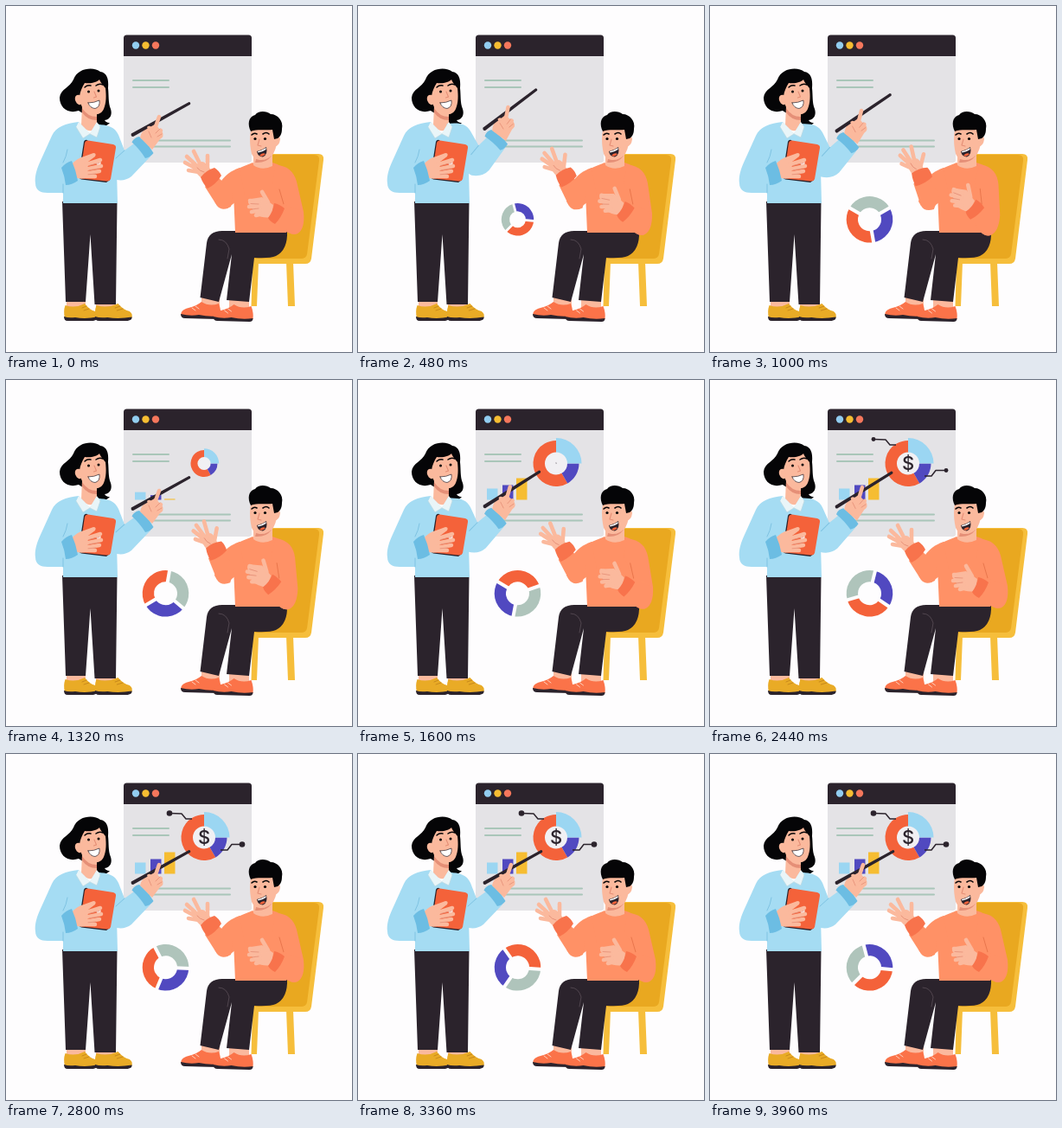
These frames come from a looping animation (400x400 px, 4 s). An HTML page with a canvas:

```html
<!DOCTYPE html>
<html lang="en">
<head>
<meta charset="utf-8">
<title>Presentation</title>
<style>
html, body { margin: 0; width: 100%; height: 100%; overflow: hidden; background: #fefdfe; }
canvas { display: block; width: 100vw; height: 100vh; }
</style>
</head>
<body>
<canvas id="stage"></canvas>
<script>
const canvas = document.getElementById('stage');
const ctx = canvas.getContext('2d');
const LOOP = 4000, STEP = 40;
const C = {
  bg: '#fefdfe', dark: '#2b232c', hair: '#050507', skin: '#fbb99d', crease: '#e58f77',
  panel: '#e4e3e6', rule: '#a9c6b9', blue: '#a5dcf3', cuff: '#6cbde3', fold: '#7fc3e2',
  red: '#f4623a', purple: '#5149c0', grey: '#afc4bb', sky: '#9bd6f2', yellow: '#f6bd32',
  seat: '#f6be3b', back: '#e9a820', shirt: '#ff9166', wrist: '#f8734c', shoe: '#fb7349'
};

const clamp = x => Math.max(0, Math.min(1, x));
const span = (t, a, b) => clamp((t - a) / (b - a));
const ease = x => x * x * (3 - 2 * x);
const wave = (t, period, end) => t < end ? (1 - Math.cos(2 * Math.PI * t / period)) / 2 : 0;
const rad = deg => deg * Math.PI / 180;

function fill(d, color) {
  ctx.fillStyle = color;
  ctx.fill(new Path2D(d));
}
function line(d, color, width = 1) {
  ctx.strokeStyle = color;
  ctx.lineWidth = width;
  ctx.stroke(new Path2D(d));
}
function dot(x, y, r, color) {
  ctx.fillStyle = color;
  ctx.beginPath();
  ctx.arc(x, y, Math.max(0, r), 0, 2 * Math.PI);
  ctx.fill();
}
function box(x, y, w, h, color) {
  ctx.fillStyle = color;
  ctx.fillRect(x, y, w, h);
}
function turned(x, y, deg, draw) {
  ctx.save();
  ctx.translate(x, y);
  ctx.rotate(rad(deg));
  ctx.translate(-x, -y);
  draw();
  ctx.restore();
}
// Angles in degrees clockwise from the top.
function sector(x, y, inner, outer, from, to, color) {
  const a = rad(from - 90), b = rad(to - 90);
  ctx.fillStyle = color;
  ctx.beginPath();
  ctx.arc(x, y, outer, a, b);
  ctx.arc(x, y, inner, b, a, true);
  ctx.closePath();
  ctx.fill();
}

function drawPanel() {
  fill('M136 58H284V178Q284 181 281 181H139Q136 181 136 178Z', C.panel);
  fill('M136 58V37Q136 33.500 139.500 33.500H280.500Q284 33.500 284 37V58Z', C.dark);
  [['#92cdf0', 150], [C.yellow, 161.500], ['#f5775c', 173]].forEach(([color, x]) => dot(x, 45.500, 4.200, color));
  line('M147 86H188M147 94H188M150 155.500H259M150 162.500H259', C.rule, 2);
}

function drawBars(t) {
  [[149, 13, C.sky], [167, 17, C.purple], [183, 25, C.yellow]].forEach(([x, h, color], i) => {
    const now = h * ease(span(t, 1120 + i * 80, 1440 + i * 80));
    box(x, 138.500 - now, 12.500, now, color);
  });
}

function drawChart(t) {
  const x = 229, y = 96.500;
  const grow = ease(span(t, 1120, 1480));
  if (!grow) return;
  dot(x, y, 14 * grow, '#f1f0f3');
  sector(x, y, 13 * grow, 26.500 * grow, 150, 360, C.red);
  sector(x, y, 13 * grow, 26.500 * grow, 90, 150, C.purple);
  sector(x, y, 13 * grow, 29.500 * grow, 0, 90, C.sky);

  const size = ease(span(t, 1520, 2000));
  if (size) {
    ctx.save();
    ctx.translate(x, y + 0.500);
    ctx.scale(size, size);
    ctx.fillStyle = C.dark;
    ctx.font = '500 22px Inter, Arial, sans-serif';
    ctx.textAlign = 'center';
    ctx.textBaseline = 'middle';
    ctx.fillText('$', 0, 0);
    ctx.restore();
  }
  drawLead(t, 'M215 75H208L203 69L189 68.500', 189, 68.500);
  drawLead(t, 'M248 111H256L261 104.500H273', 273, 104.500);
}

function drawLead(t, d, x, y) {
  const k = span(t, 1880, 2320), length = 31;
  if (k) {
    ctx.save();
    ctx.lineCap = 'butt';
    ctx.setLineDash([length * k, 60]);
    line(d, C.dark, 1.500);
    ctx.restore();
  }
  dot(x, y, 3.300 * ease(span(t, 2280, 2520)), C.dark);
}

function drawRing(t) {
  const k = ease(span(t, 200, 640));
  if (!k) return;
  const angle = t < 1000 ? 45 + (t - 480) * 75 / 520 : 120 + (t - 1000) * 0.218;
  const cuts = [-60, 50, 180, 300];
  ctx.save();
  ctx.translate(184.500, 246.800);
  ctx.scale(k, k);
  ctx.rotate(rad(angle));
  [C.purple, C.red, C.grey].forEach((color, i) =>
    sector(0, 0, 13.500, 26.800, cuts[i], cuts[i + 1], color));
  cuts.slice(1).forEach(cut => turned(0, 0, cut, () => line('M0 -11V-29', C.bg, 4)));
  ctx.restore();
}

function drawWomanLegs() {
  fill('M70 338H92V350H70ZM104 338H126V350H104Z', C.skin);
  fill('M65 226H128.500L127 345H102.500L97.500 264L92 342H69Z', C.dark);
  const shoe = 'M68.500 346Q80 350 91 344Q96 351 103 353Q107 356 105 361H68Q66 353 68.500 346Z';
  const sole = 'M67 359Q72 361 80 360Q92 362 105.500 359.500Q106 363 101 364H71Q67 364 67 359Z';
  [[0, 0, 1], [28.500, 0, 1.110]].forEach(([dx, dy, sx]) => {
    ctx.save();
    ctx.translate(dx, dy);
    ctx.scale(sx, 1);
    fill(shoe, '#e9ab26');
    fill(sole, C.dark);
    line('M88 349L93 347M90 352L96 350', '#c98a1c');
    ctx.restore();
  });
}

function drawWomanHead() {
  fill('M78 85C74 94 63 96 62 106C62 118 72 125 84 121L104 134C109 140 116 140 120 135C116 135 115 133 114 132C121 131 123 125 121 119C118 112 119 103 118 95C119 83 116 77 109 76C102 70 83 71 78 85Z', C.hair);
  fill('M88 116H105V139Q97 150 87 138Z', C.skin);
  fill('M88 118Q94 128 105 128V132Q94 132 88 123Z', C.crease);
  fill('M85 104C86 98 88 94 91 89C99 90 105 88 108 85C110 90 113 92 115 95C116 104 116 112 113 119C110 126 102 127 95 123C89 120 85 114 85 104Z', C.skin);
  fill('M87 104C81 100 78 106 81 111C83 115 87 115 88 112Z', C.skin);
  line('M91 94Q94 91 98 92M104 92Q108 89 112 91', C.hair, 1.500);
  dot(95.500, 99, 1.500, C.hair);
  dot(107, 98, 1.500, C.hair);
  line('M102 99L104.500 105L101.500 106', C.crease, 1.100);
  const smile = 'M95 112Q102 112 108 109Q109 117 103 118.500Q97 118 95 112Z';
  fill(smile, '#fff');
  line(smile, C.dark, 0.700);
}

function drawPointerArm(deg) {
  turned(98, 147, deg, () => {
    fill('M104 137C118 137 126 140 130 149L137 167L148 159L167 174L145 197Q136 204 124 200L104 184Z', C.blue);
    line('M137 167L127 176', C.fold, 1);
    fill('M145.500 157.500Q148 152 154 151Q164 159 170.500 170Q167 175 161 176Q155 166 145.500 157.500Z', C.cuff);
    fill('M155 152Q157 143 164 139Q169 134 173 137L181 146Q183 151 178 154L169 166Z', C.skin);
    fill('M144.800 147.500L211.500 111Q214 111.500 213 113.800L147 151Q144 151 144.800 147.500Z', C.dark);
    fill('M163 140Q166 137 169 141L174 151Q172 156 168 153Z', C.skin);
    line('M171 145L177 128', C.skin, 4.500);
    line('M174 149L179 144M172 153L179 150', C.skin, 4.500);
    line('M173 147L178 142M175 151L180 148M165 145L168 152', C.crease, 0.800);
  });
}

function drawWoman(deg) {
  drawWomanLegs();
  drawWomanHead();
  fill('M84 134C69 136 58 139 53 150L39 181C35 190 33 198 34 205C34 213 40 216 48 216H66V228H129L128 190L116 143Q111 137 104 136L97 148Z', C.blue);
  line('M66 181Q70 174 71 166M66 216V206', C.fold);
  drawPointerArm(deg);
  fill('M84 134L97 147L105 134L109 140L105 152L97 148L89 153L81 140Z', '#e9f5f8');
  line('M97 148L89 153L81 140M97 148L105 152L109 140', '#b9d8e2', 0.800);
  fill('M94 155Q91 154 90 157L84 195Q83 199 87 200.500L116 204L120 201Z', C.dark);
  fill('M95 155.500L124 160Q127.500 161 127 164L121 200Q120 203 116 202.500L88 199.500Q85 199 85.500 196L91 158Q92 155 95 155.500Z', C.red);
  dot(107, 181.500, 2.600, '#fbe9e4');
  fill('M76 183Q82 176 90 174L101 170Q105 170 103 174L95 180L94 198Q86 202 78 197Z', C.skin);
  line('M90 184L109 178M91 189L110 185M91 194L108 191M90 197L103 197', C.skin, 4.500);
  line('M96 184.500L108 181.500M96 189.800L107 188M95 194.800L104 194', C.crease, 0.800);
  fill('M64 187Q69 181 76 179Q81 190 83 202Q76 207 69 207Q68 197 64 187Z', C.cuff);
}

function drawChair() {
  fill('M285 296H292L290 347H283.500ZM324 296H332L334 347H326Z', C.seat);
  fill('M309 171H361Q368 171 367 178L353 292Q352 298 346 298H285V286L304 282V176Q304 171 309 171Z', C.seat);
  fill('M309 172H356Q363 172 362 179L348 287Q347 292 341 292H285V284L304 280V177Q304 172 309 172Z', C.back);
}

function drawManLegs() {
  fill('M226 334H247V350H226ZM258 334H281V350H258Z', C.skin);
  fill('M250 260H325Q326 282 312 289Q305 292 287 291L281 342L255 340L261 287L246 342L224.500 337L232 274Q234 260 250 260Z', C.dark);
  line('M246 270Q255 270 258 281L256 292', '#51464f');
  const shoe = 'M226 342Q235 348 246 344Q249 352 248 359H203Q200 352 211 349Q220 347 226 342Z';
  const sole = 'M202 356Q213 359 223 357Q236 360 248 358Q248 362 244 362L207 361Q202 361 202 356Z';
  [[0, 0], [37.500, 3]].forEach(([dx, dy]) => {
    ctx.save();
    ctx.translate(dx, dy);
    fill(shoe, C.shoe);
    fill(sole, C.dark);
    line('M219 347L223 350M215 349L219 352', '#ffd0bc');
    ctx.restore();
  });
}

function drawManHead() {
  fill('M286 168H308V185Q296 191 286 184Z', C.skin);
  fill('M289 177Q300 177 307 168V173Q301 182 288 181Z', C.crease);
  fill('M283 143H313Q315 160 309 171Q302 179 293 178Q284 177 283 166Q281 154 283 143Z', C.skin);
  fill('M310 153Q316 147 317 154Q316 162 310 163Z', C.skin);
  fill('M283 145C279 137 280 128 288 126C291 121 301 121 306 125C314 125 321 133 319 142C319 148 317 151 314 153L310 154L308 143C300 144 290 142 283 145Z', C.hair);
  line('M284 149Q287 146 290 148M297 148Q301 145 304 148', C.hair, 1.600);
  dot(288, 153.500, 1.600, C.hair);
  dot(299.500, 153.500, 1.600, C.hair);
  line('M293 154L291 161L295 162', C.crease, 1.100);
  fill('M290 168Q296 167 301 163Q303 172 297 174.500Q291 174 290 168Z', C.dark);
  fill('M291 168Q296 167 300.500 164V166Q296 169 291.500 169.500Z', '#fff');
  fill('M293 173Q296 169 300 171Q297 175 293 173Z', C.red);
}

function drawWaveArm(deg) {
  fill('M270 187C261 190 254 195 249 202L241 226Q246 236 256 234L276 218Z', C.shirt);
  turned(247, 229, deg, () => {
    fill('M242 195L262 214L260 232Q250 238 244 231L230 209Z', C.shirt);
    fill('M221 184Q226 176 233 184L240 194L231 202Q222 197 219 191Z', C.skin);
    line('M222 189L207 181M223 187L209 174M225 184L217 168M233 188L233 173M223 192L211 190', C.skin, 4.600);
    line('M221 187Q224 191 229 192', C.crease, 0.900);
    fill('M225 198Q231 190 241 187Q246 190 249 196Q243 206 233 211Q228 206 225 198Z', C.wrist);
  });
}

function drawChestArm(k) {
  turned(318, 190, 10 * k, () => {
    fill('M311 184C326 184 333 192 336 203L344 238Q346 258 337 263Q330 266 321 258L321 229L308 205Z', C.shirt);
    line('M321 229L316 212', '#e9764c', 1);
    turned(333, 252, 8 * k, () => {
      fill('M309 247L321 229L340 236Q346 256 337 263Q330 266 321 258Z', C.shirt);
      fill('M309 230L296 221L283 223Q278 226 281 229L289 241Q297 246 307 244Z', C.skin);
      line('M293 226L282 225M293 231L281 232M294 236L284 238M297 240L289 242M303 227L296 215', C.skin, 4.600);
      line('M292 229L283 228.500M292 234L284 235', C.crease, 0.800);
      fill('M310 228Q316 229 322 234Q318 245 311 252Q305 249 303 245Q309 237 310 228Z', C.wrist);
    });
  });
}

function drawMan(k) {
  drawChair();
  drawManLegs();
  fill('M285 181C276 185 268 187 262 193L265 262H324L332 250L326 194Q320 184 308 181Q297 192 285 181Z', C.shirt);
  drawManHead();
  drawWaveArm(14 * k);
  drawChestArm(k);
}

function draw(t) {
  const w = Math.round(innerWidth * devicePixelRatio);
  const h = Math.round(innerHeight * devicePixelRatio);
  if (canvas.width !== w || canvas.height !== h) {
    canvas.width = w;
    canvas.height = h;
  }
  ctx.setTransform(w / 400, 0, 0, h / 400, 0, 0);
  ctx.lineCap = ctx.lineJoin = 'round';
  box(0, 0, 400, 400, C.bg);
  drawPanel();
  drawBars(t);
  drawChart(t);
  drawRing(t);
  drawWoman(-10 * wave(t, 1340, 2680));
  drawMan(wave(t, 2000, 2000));
}

const start = performance.now();
function tick() {
  const t = Math.max(0, performance.now() - start) % LOOP;
  draw(Math.floor(t / STEP) * STEP);
  requestAnimationFrame(tick);
}
tick();
</script>
</body>
</html>
```
